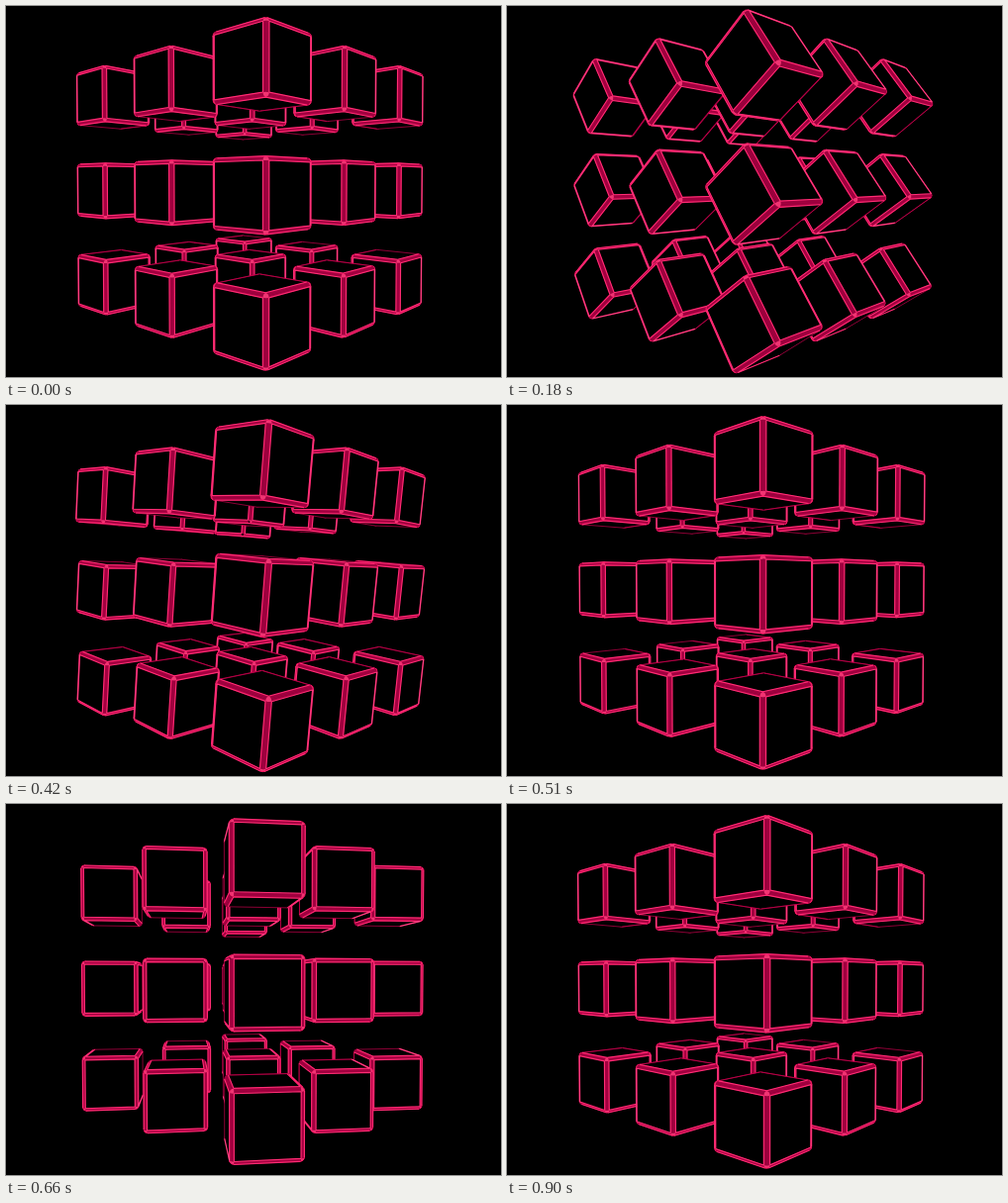
These frames come from a looping animation (500x375 px, 0.93 s). An HTML page with a canvas:

```html
<!DOCTYPE html>
<html lang="en">
<head>
<meta charset="utf-8">
<title>Turning cubes</title>
<style>
  html, body { margin: 0; width: 100%; height: 100%; overflow: hidden; background: #000; }
  canvas { display: block; }
</style>
</head>
<body>
<canvas id="stage" width="500" height="375"></canvas>
<script>
const ctx = document.getElementById('stage').getContext('2d');

const LOOP = 930, STEP = 30, HALF_TIME = 450;
const FOCAL = 500, CX = 247, CY = 187.5, PITCH = 0.023;
const CAM_HEIGHT = 15.5, DISTANCE = 764;
const HALF = 40, ROUND = 4.5, INSET = HALF - ROUND, STRIPS = 5;
const REST_YAW = 2.6, LAYER_GAP = 139.5;
const ROW = [98.9, 105.7], COLUMN = [-112.1, 104.9];   // grid steps as [x, z]
const SIGNS = [-1, 1], rad = Math.PI / 180;

// Cube centres relative to the camera, far to near
const cubes = [];
for (let a = -1; a <= 1; a++)
  for (let b = -1; b <= 1; b++)
    for (let c = -1; c <= 1; c++)
      cubes.push([
        a * ROW[0] + b * COLUMN[0],
        c * LAYER_GAP - CAM_HEIGHT,
        a * ROW[1] + b * COLUMN[1] + DISTANCE
      ]);
cubes.sort((p, q) => Math.hypot(...q) - Math.hypot(...p));

const dot = (p, q) => p[0] * q[0] + p[1] * q[1] + p[2] * q[2];

function project([x, y, z]) {
  const depth = z - PITCH * y;
  return [CX + FOCAL * x / depth, CY - FOCAL * (y + PITCH * z) / depth];
}

// Tumble by a quarter turn, then spin by a quarter turn
function axesAt(t) {
  let yaw = REST_YAW, tilt = 0;
  if (t < HALF_TIME) {
    tilt = 90 * t / HALF_TIME;
  } else {
    const s = Math.min(1, (t - HALF_TIME) / HALF_TIME);
    yaw -= 90 * s * s * (3 - 2 * s);
  }
  const a = (45 + yaw) * rad, b = tilt * rad;
  const ca = Math.cos(a), sa = Math.sin(a), cb = Math.cos(b), sb = Math.sin(b);
  return [
    [ca, 0, sa],
    [-sa * cb, -sb, ca * cb],
    [-sa * sb, cb, ca * sb]
  ];
}

function trace(path, points, close) {
  points.forEach((p, i) => i ? path.lineTo(...p) : path.moveTo(...p));
  if (close) path.closePath();
}

function stroke(path, color, width) {
  ctx.strokeStyle = color;
  ctx.lineWidth = width;
  ctx.stroke(path);
}

function drawCube(center, axes) {
  const place = p => [0, 1, 2].map(n =>
    center[n] + p[0] * axes[0][n] + p[1] * axes[1][n] + p[2] * axes[2][n]);
  const local = (i, pi, pj, pk) => {
    const p = [0, 0, 0];
    p[i] = pi;
    p[(i + 1) % 3] = pj;
    p[(i + 2) % 3] = pk;
    return p;
  };
  const turn = p => place(p).map((v, n) => v - center[n]);
  const faces = (normal, point) => dot(turn(normal), place(point)) < 0;
  const isFar = p => p[2] - center[2] > 10;

  // Rounded corners
  for (const a of SIGNS) for (const b of SIGNS) for (const c of SIGNS) {
    const p = place([a * INSET, b * INSET, c * INSET]);
    const ball = new Path2D();
    ball.arc(...project(p), ROUND * FOCAL / p[2], 0, 2 * Math.PI);
    const far = isFar(p);
    ctx.fillStyle = far ? '#000' : '#f03472';
    ctx.fill(ball);
    stroke(ball, far ? '#c0004a' : '#ff1463', far ? 0.7 : 1);
  }

  // Flat faces
  const body = new Path2D();
  for (let i = 0; i < 3; i++) for (const s of SIGNS) {
    const normal = local(i, s, 0, 0), mid = local(i, s * HALF, 0, 0);
    if (!faces(normal, mid)) continue;
    const ring = [[-1, -1], [1, -1], [1, 1], [-1, 1]].map(([b, c]) =>
      project(place(local(i, s * HALF, b * INSET, c * INSET))));
    trace(body, s > 0 ? ring : ring.reverse(), true);
  }
  ctx.fillStyle = '#000';
  ctx.fill(body);

  // Rounded edges, cut into lengthwise strips
  const band = new Path2D(), fine = new Path2D(), bright = new Path2D(), dim = new Path2D();
  for (let i = 0; i < 3; i++) for (const sj of SIGNS) for (const sk of SIGNS) {
    const normalAt = a => local(i, 0, sj * Math.cos(a), sk * Math.sin(a));
    const pointAt = (a, end) => local(i, end * INSET,
      sj * (INSET + ROUND * Math.cos(a)), sk * (INSET + ROUND * Math.sin(a)));
    const angle = m => m / STRIPS * Math.PI / 2;
    const seen = [faces(local(i, 0, sj, 0), local(i, 0, sj * HALF, 0))];
    const lines = [];
    for (let m = 0; m <= STRIPS; m++) {
      lines.push(SIGNS.map(end => project(place(pointAt(angle(m), end)))));
      if (m < STRIPS) {
        const a = angle(m + 0.5);
        seen.push(faces(normalAt(a), pointAt(a, 0)));
      }
    }
    seen.push(faces(local(i, 0, 0, sk), local(i, 0, 0, sk * HALF)));

    const far = isFar(place(pointAt(Math.PI / 4, 0)));
    for (let m = 0; m <= STRIPS; m++) {
      if (m < STRIPS && seen[m + 1])
        trace(band, [...lines[m], ...lines[m + 1].slice().reverse()], true);
      if (!seen[m] && !seen[m + 1]) continue;
      const border = m === 0 || m === STRIPS || seen[m] !== seen[m + 1];
      trace(!border ? fine : far ? dim : bright, lines[m]);
    }
  }
  ctx.fillStyle = '#8c0038';
  ctx.fill(band);
  stroke(fine, 'rgba(230, 0, 88, 0.55)', 0.5);
  stroke(dim, '#c8004c', 0.7);
  stroke(bright, '#ff0f60', 1.15);
  stroke(bright, 'rgba(255, 175, 205, 0.4)', 0.5);
}

function draw(t) {
  const axes = axesAt(t);
  ctx.fillStyle = '#000';
  ctx.fillRect(0, 0, 500, 375);
  for (const center of cubes) drawCube(center, axes);
}

const start = performance.now();
let shown = -1;
function tick() {
  const elapsed = (performance.now() - start) % LOOP;
  const t = Math.floor(elapsed / STEP) * STEP;
  if (t !== shown) draw(shown = t);
  requestAnimationFrame(tick);
}
tick();
</script>
</body>
</html>
```
